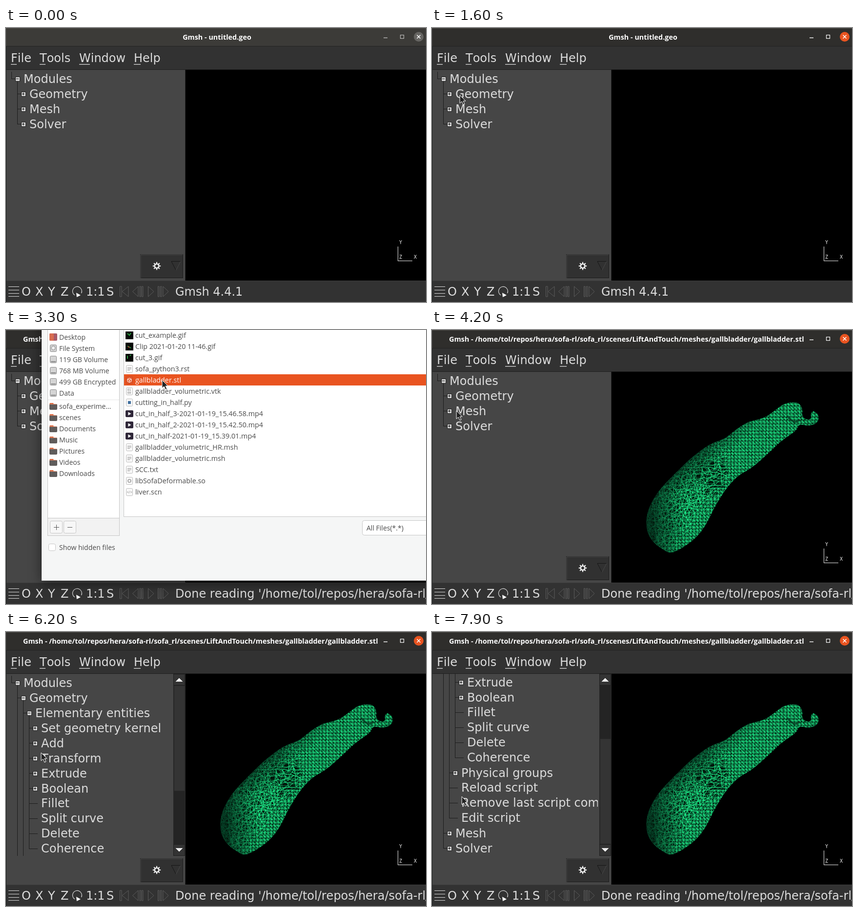
Animation, 861 px wide and 563 px high, one loop 8 s. Source, as an HTML page:

```html
<!DOCTYPE html>
<html lang="en">
<head>
<meta charset="utf-8">
<title>Opening a mesh</title>
<style>
  html, body { margin: 0; width: 100%; height: 100%; overflow: hidden; background: #000; }
  svg { display: block; width: 100vw; height: 100vh; }
  text { white-space: pre; }
  .ui { font: 24px "DejaVu Sans", sans-serif; font-kerning: none; font-variant-ligatures: none; fill: #dcdcdc; }
  .title { font: bold 14.4px "Open Sans", sans-serif; fill: #fff; }
  .list { font: 14.3px "Open Sans", sans-serif; fill: #4a4a4a; }
  .side { font: 14px "Open Sans", sans-serif; fill: #4a4a4a; }
  .axis { font: 10px "DejaVu Sans Mono", monospace; fill: #eee; }
  .tiny { font: 6px "DejaVu Sans Mono", monospace; fill: #777; }
  .crisp { shape-rendering: crispEdges; }
</style>
</head>
<body>
<svg id="stage" viewBox="0 0 861 563"></svg>
<script>
const stage = document.getElementById('stage');

function add(parent, tag, attrs = {}, text) {
  const el = document.createElementNS('http://www.w3.org/2000/svg', tag);
  for (const key in attrs) el.setAttribute(key, attrs[key]);
  if (text !== undefined) el.textContent = text;
  parent.appendChild(el);
  return el;
}
const group = (p, attrs) => add(p, 'g', attrs);
const rect = (p, x, y, width, height, fill, more) => add(p, 'rect', { x, y, width, height, fill, ...more });
const label = (p, x, y, text, cls = 'ui', more) => add(p, 'text', { x, y, class: cls, ...more }, text);
const path = (p, d, stroke, fill = 'none', more) => add(p, 'path', { d, stroke, fill, ...more });
const clip = id => add(stage, 'clipPath', { id });
const clamp = (v, max = 1) => Math.max(0, Math.min(max, v));
const show = (el, on) => el.setAttribute('display', on ? 'inline' : 'none');

// ---- window frame ----
rect(stage, 0, 0, 861, 563, '#323232');
const bar = rect(stage, 0, 0, 861, 38, '#3c3b38');
rect(stage, 0, 0, 861, 1, '#4b4a47');
rect(stage, 0, 37, 861, 1, '#222');
const shortTitle = label(stage, 432.5, 24, 'Gmsh - untitled.geo', 'title', { 'text-anchor': 'middle' });
const longTitle = label(stage, 35, 24,
  'Gmsh - /home/tol/repos/hera/sofa-rl/sofa_rl/scenes/LiftAndTouch/meshes/gallbladder/gallbladder.stl', 'title');
const controls = group(stage);
rect(controls, 774, 19.5, 8, 1.4, '#fff');
rect(controls, 808.5, 14.5, 7, 7, 'none', { stroke: '#fff', 'stroke-width': 1.2 });
const closeDisc = add(stage, 'circle', { cx: 846, cy: 18, r: 10 });
path(stage, 'M842.5 14.5l7 7m0-7l-7 7', '#fff', 'none', { 'stroke-width': 1.5 });

const fileTab = rect(stage, 1, 39, 60, 46, '#000080');
[['File', 10, 12], ['Tools', 69, 12], ['Window', 150, 22], ['Help', 262, 14]].forEach(([s, x, w]) => {
  label(stage, x, 70, s);
  rect(stage, x, 74, w, 1.3, '#dcdcdc');
});

// ---- side panel and viewport ----
rect(stage, 0, 85, 861, 1, '#1e1e1e');
rect(stage, 0, 86, 367, 433, '#464646');
rect(stage, 367, 86, 1, 433, '#2a2a2a');
rect(stage, 368, 86, 493, 433, '#000');
rect(stage, 0, 519, 861, 1, '#3c3c3c');
rect(stage, 0, 38, 1, 525, '#161a19');

const treeClip = rect(clip('treeClip'), 1, 86, 339, 433, '#fff');
const treeBox = group(stage, { 'clip-path': 'url(#treeClip)' });

// depth, label; a leading dash marks an entry without a box
const entries = [
  [0, 'Modules'], [1, 'Geometry'], [2, 'Elementary entities'],
  [3, 'Set geometry kernel'], [3, 'Add'], [3, 'Transform'], [3, 'Extrude'], [3, 'Boolean'],
  [3, '-Fillet'], [3, '-Split curve'], [3, '-Delete'], [3, '-Coherence'],
  [2, 'Physical groups'], [2, '-Reload script'], [2, '-Remove last script command'], [2, '-Edit script'],
  [1, 'Mesh'], [1, 'Solver']
];

function buildTree(maxDepth) {
  const g = group(treeBox);
  const lines = group(g, { class: 'crisp' });
  const rows = entries.filter(e => e[0] <= maxDepth);
  const lastY = [];
  rows.forEach(([depth, name], i) => {
    const y = 104 + 31 * i, x = 23 + 12 * depth;
    const leaf = name[0] === '-';
    const top = depth ? lastY[depth - 1] : 90;
    lastY[depth] = y;
    path(lines, `M${x - 11.5} ${top}V${y + .5}H${leaf ? x + 6 : x}`, '#1c1c1c');
    label(g, x + 13, y + (leaf ? 8 : 9), leaf ? name.slice(1) : name);
    if (leaf) return;
    const open = rows[i + 1] && rows[i + 1][0] > depth;
    const box = group(g, { class: 'crisp' });
    rect(box, x - 4, y - 4, 9, 9, '#d0d0d0', { stroke: '#222', 'stroke-width': 1 });
    rect(box, x - 2, y, 5, 1, '#000');
    if (!open) rect(box, x, y - 2, 1, 5, '#000');
  });
  return g;
}
const trees = [1, 2, 3].map(buildTree);

const scroller = group(stage, { class: 'crisp' });
rect(scroller, 343, 86, 24, 374, '#242424');
const thumb = rect(scroller, 344, 110, 22, 216, '#343434', { stroke: '#282828' });
[[86, 'M348 102l7-8 7 8z'], [436, 'M348 444l7 8 7-8z']].forEach(([y, d]) => {
  rect(scroller, 343.5, y + .5, 23, 23, '#343434', { stroke: '#1e1e1e' });
  path(scroller, d, 'none', '#eee');
});

rect(stage, 275.5, 465.5, 87, 48, '#313131', { stroke: '#1c1c1c' });
path(stage, 'M276 514V466H362', '#4c4c4c');
add(stage, 'circle', { cx: 309, cy: 489, r: 4.2, fill: 'none', stroke: '#eee', 'stroke-width': 2.6 });
for (let i = 0; i < 8; i++)
  rect(stage, 307.9, 480.8, 2.2, 4, '#eee', { transform: `rotate(${45 * i} 309 489)` });
path(stage, 'M348.5 498L339 479.5H358', '#161616');
path(stage, 'M358 479.5L348.5 498', '#484848');

// ---- wireframe ----
const outline = [
  739,148, 752,150, 760,162, 758,177, 766,184, 778,184, 776,171, 783,166, 792,174, 793,185,
  785,194, 770,197, 752,193, 747,207, 715,228, 690,253, 655,284, 630,297, 608,319, 590,345,
  575,372, 562,400, 545,423, 525,440, 505,452, 488,459, 472,450, 455,438, 443,420, 439,400,
  441,376, 452,350, 470,324, 497,296, 530,264, 560,241, 578,231, 600,224, 620,207, 648,188,
  680,182, 700,168, 720,152
];

function smoothShape(p) {
  const n = p.length / 2, at = i => [p[2 * (i % n)], p[2 * (i % n) + 1]];
  const mid = i => at(i).map((v, k) => (v + at(i + 1)[k]) / 2);
  let d = 'M' + mid(0);
  for (let i = 1; i <= n; i++) d += `Q${at(i)} ${mid(i)}`;
  return d + 'Z';
}

function noise(i, j) {
  const v = Math.sin(i * 127.1 + j * 311.7) * 43758.5453;
  return v - Math.floor(v);
}

const shape = smoothShape(outline);
path(clip('body'), shape);
const mesh = group(stage, { 'clip-path': 'url(#body)' });
path(mesh, shape, '#0a5632', '#02180c');

// regular on the lit flank, loose towards the dark side and around the waist
function wire(step, wobble, gain, seed) {
  const levels = Array(8).fill('');
  const waist = (x, y) => clamp(1.5 - Math.hypot(x - 565, y - 295) / 34);
  const dark = (x, y) => clamp((620 - x) / 90) * clamp((945 - x - y) / 50);
  const point = (i, j) => {
    const x = 436 + i * step, y = 146 + j * step;
    const k = 2 * wobble * Math.max(waist(x, y), dark(x, y)) + .3;
    return [x + (noise(i + seed, j) - .5) * k, y + (noise(j, i + seed + 40) - .5) * k];
  };
  const f = v => v.map(c => c.toFixed(1));
  for (let i = 0; i * step < 360; i++) for (let j = 0; j * step < 315; j++) {
    const a = point(i, j), sum = a[0] + a[1];
    if (sum < 780 || sum > 995) continue;
    const light = Math.min(clamp(.4 + (sum - 810) / 80), clamp(.12 + (a[0] - 455) / 75), clamp(.5 + (980 - sum) / 50));
    const shade = clamp(light * gain * (.85 + .3 * noise(j + seed, i)));
    const b = point(i + 1, j), c = point(i, j + 1), e = point(i + 1, j + 1);
    const gap = noise(i + 7, j + seed) < .5 * waist(...a);
    const flip = dark(...a) > .2 && noise(i, j + seed) < .5;
    const diagonal = gap ? '' : flip ? `M${f(b)}L${f(c)}` : `M${f(a)}L${f(e)}`;
    levels[Math.round(shade * 7)] += `M${f(b)}L${f(a)}` + (gap ? '' : `L${f(c)}`) + diagonal;
  }
  levels.forEach((d, k) => {
    const s = k / 7;
    path(mesh, d || 'M0 0', `rgb(${6 + 26 * s | 0},${66 + 184 * s | 0},${40 + 106 * s | 0})`);
  });
}
wire(6, 3, .36, 9);
wire(7.2, 3.4, 1, 0);
path(mesh, 'M728 176Q742 196 754 184', '#06331d', 'none', { 'stroke-width': 4, 'stroke-opacity': .7 });

path(stage, 'M803.5 449V478.5H833', '#eee', 'none', { class: 'crisp' });
[['Y', 806, 444], ['X', 836, 474], ['Z', 806, 474]].forEach(([s, x, y]) => label(stage, x, y, s, 'axis'));

// ---- status bar ----
path(stage, 'M5 531.5H27M5 538.5H27M5 545.5H27M5 551.5H27', '#dcdcdc', 'none', { class: 'crisp' });
[['O', 32], ['X', 60], ['Y', 86], ['Z', 112], ['1:1', 164], ['S', 206]].forEach(([s, x]) => label(stage, x, 550, s));
path(stage, 'M141 549A9.5 9.5 0 1 1 154.5 545', '#dcdcdc', 'none', { 'stroke-width': 1.2 });
path(stage, 'M144 544l9 5-8 4z', 'none', '#fff');
path(stage, 'M233.5 531H237V552H233.5ZM251 531V552L238 541.5ZM271 531V552L259.5 541.5Z' +
  'M274 531h2.5v21H274ZM278.5 531h2.5v21h-2.5ZM291.5 531V552L303 541.5Z' +
  'M311.5 531h2.5v21h-2.5ZM316.5 531h2.5v21h-2.5ZM322 531V552L333 541.5Z', '#5c5c5c');
const status = label(stage, 347, 550, '');

// ---- File menu ----
const menu = group(stage);
rect(menu, 3, 86, 462, 454, '#323232', { stroke: '#1a1a1a', style: 'filter:drop-shadow(0 3px 6px rgba(0,0,0,.5))' });
const hover = rect(menu, 6, 89, 456, 32, '#000080');
[['New...', 'Ctrl+N'], ['Open...', 'Ctrl+O'], ['Merge...', 'Shift+Ctrl+O'], ['Watch Pattern...'],
 ['Open Recent', '▶'], ['Clear'], ['Remote', '▶'], ['Rename...', 'Ctrl+R'], ['Delete'],
 ['Save Mesh', 'Shift+Ctrl+S'], ['Save Model Options', 'Ctrl+J'],
 ['Save Options As Default', 'Shift+Ctrl+J'], ['Export...', 'Ctrl+E'], ['Quit', 'Ctrl+Q']
].forEach(([name, keys], i) => {
  const y = 113 + 32 * i;
  label(menu, 12, y, name);
  if (keys) label(menu, 458, y, keys, 'ui', { 'text-anchor': 'end' });
  if ([4, 6, 8, 11].includes(i)) rect(menu, 4, y + 8, 460, 1, '#555');
});

// ---- file dialog ----
const dialog = group(stage);
rect(dialog, 73, -250, 850, 765, '#f5f6f6', { style: 'filter:drop-shadow(0 4px 12px rgba(0,0,0,.55))' });
const edge = { stroke: '#c6c6c6' };
rect(dialog, 85.5, -100, 147, 522.5, '#f2f2f2', edge);
rect(dialog, 85.5, -100, 147, 486.5, '#fff', edge);
rect(dialog, 241.5, -100, 700, 483.5, '#fff', edge);
rect(dialog, 86, 143, 146, 1, '#e6e6e6');

['Desktop', 'File System', '119 GB Volume', '768 MB Volume', '499 GB Encrypted', 'Data', 'sofa_experime…',
 'scenes', 'Documents', 'Music', 'Pictures', 'Videos', 'Downloads'].forEach((name, i) => {
  const y = 15 + 23 * i + (i > 5 ? 4 : 0);
  label(dialog, 109, y + 5, name, 'side');
  if (i > 5) {
    rect(dialog, 89.5, y - 7, 8, 5, '#d9643a', { rx: 1 });
    rect(dialog, 89, y - 5, 16, 12, '#5f5c5b', { rx: 2 });
    rect(dialog, 90, y - 5, 14, 1, '#e08a6c');
  } else if (i === 0) {
    rect(dialog, 89, y - 8, 16, 15, '#a85a68', { rx: 2 });
    rect(dialog, 89, y - 8, 9, 15, '#d86c50', { rx: 2 });
  } else {
    rect(dialog, 90.5, y - 7.5, 13, 14, '#d4d4d4', { rx: 2, stroke: '#888' });
    if (i === 1) add(dialog, 'circle', { cx: 97, cy: y - 1, r: 4, fill: '#eee', stroke: '#888' });
    else rect(dialog, 92, y + 3, 10, 2, '#8a8a8a');
  }
});

const picked = rect(dialog, 242, 91, 640, 23, '#e95420');
const files = [
  ['cut_example.gif', 'gif'], ['Clip 2021-01-20 11-46.gif', 'gif'], ['cut_3.gif', 'gif'], ['sofa_python3.rst', 'doc'],
  ['gallbladder.stl', 'stl'], ['gallbladder_volumetric.vtk', 'bin'], ['cutting_in_half.py', 'py'],
  ['cut_in_half_3-2021-01-19_15.46.58.mp4', 'mp4'], ['cut_in_half_2-2021-01-19_15.42.50.mp4', 'mp4'],
  ['cut_in_half-2021-01-19_15.39.01.mp4', 'mp4'], ['gallbladder_volumetric_HR.msh', 'doc'],
  ['gallbladder_volumetric.msh', 'doc'], ['SCC.txt', 'doc'], ['libSofaDeformable.so', 'so'], ['liver.scn', 'xml']
];
function fileIcon(kind, y, i) {
  const g = group(dialog, { transform: `translate(245 ${y - 8})` });
  if (kind === 'gif') {
    rect(g, 0, 0, 16, 16, '#050805');
    path(g, ['M4 4l4 4 3-5', 'M4 7l7 4', 'M4 4v6M9 4l2-2'][i], '#2aa040', 'none', { 'stroke-width': 2 });
    if (i === 1) rect(g, 5, 8, 3, 2, '#b33');
  } else if (kind === 'mp4') {
    rect(g, 0, 1, 16, 14, '#2e2638', { rx: 2 });
    path(g, 'M5.5 4.5v7l6-3.5z', 'none', '#fff');
  } else if (kind === 'stl') {
    rect(g, 1.5, .5, 13, 15, '#e2572b', { rx: 2, stroke: '#c9481f' });
    path(g, 'M8 4l4 2v4.5l-4 2-4-2V6zM4 6l4 2 4-2M8 8v4.5', '#fff');
  } else {
    rect(g, 1.5, .5, 13, 15, '#f8f8f8', { rx: 2, stroke: '#bbb' });
    if (kind === 'doc') path(g, 'M4 5.5h8M4 8h8M4 10.5h5', '#999');
    if (kind === 'bin') { label(g, 4, 7, '01', 'tiny'); label(g, 4, 13, '00', 'tiny'); }
    if (kind === 'py') rect(g, 5, 5, 6, 6, '#3f6f9f');
    if (kind === 'so') add(g, 'circle', { cx: 8, cy: 8, r: 3, fill: 'none', stroke: '#999', 'stroke-width': 1.5 });
    if (kind === 'xml') label(g, 2.7, 10, '</>', 'tiny');
  }
}
const names = files.map(([name, kind], i) => {
  const y = 11 + 23 * i;
  fileIcon(kind, y, i);
  return label(dialog, 265, y + 5, name, 'list');
});

[90.5, 118.5].forEach(x => rect(dialog, x, 392.5, 25, 25, '#f7f7f7', { rx: 3, ...edge }));
path(dialog, 'M98 405.5h11M103.5 400v11M126 405.5h10', '#555');
rect(dialog, 87.5, 439.5, 14, 14, '#fff', { rx: 3, ...edge });
label(dialog, 109, 452, 'Show hidden files', 'side');
rect(dialog, 730.5, 391.5, 190, 30, '#fff', { rx: 4, ...edge });
label(dialog, 739, 412, 'All Files(*.*)', 'side');

// ---- pointer ----
const pointer = group(stage);
path(pointer, 'M0 0V16.5L4 13L7 19.5L10 18.2L7 12H12Z', '#fff', '#222', { 'stroke-width': 1 });

// time, x, y
const track = [
  [300, 119, 8], [400, 67, 69], [500, 67, 69], [600, 28, 70], [700, 24, 72], [800, 24, 72],
  [1100, 57, 138], [1800, 57, 138], [2000, 165, 104], [2100, 217, 94], [2200, 217, 94], [2300, 272, 97],
  [2500, 320, 111], [2700, 327, 112], [2800, 327, 112], [2900, 320, 103], [3600, 320, 103],
  [3800, 220, 140], [4000, 95, 176], [4100, 66, 178], [4200, 50, 166], [4500, 39, 142],
  [4600, 35, 138], [4900, 35, 138], [5200, 76, 219], [5300, 80, 225], [5600, 47, 167],
  [5900, 47, 167], [6200, 72, 248], [6300, 78, 285], [6600, 61, 338], [8000, 61, 338]
];
function along(t) {
  const i = track.findIndex(k => k[0] > t);
  const a = track[i - 1], b = track[i], p = (t - a[0]) / (b[0] - a[0]);
  return [a[1] + (b[1] - a[1]) * p, a[2] + (b[2] - a[2]) * p].map(Math.round);
}

// time, opacity, scale
const fades = [[0, 0, 1], [1800, .3, .92], [1900, .75, .97], [2000, 1, 1], [3400, .4, .96], [3500, 0, 1]];

function draw(t) {
  const active = t >= 600 && t < 1700 || t >= 3300;
  const loaded = t >= 3300;
  bar.setAttribute('fill', active ? '#2f2e2c' : '#3c3b38');
  closeDisc.setAttribute('fill', active ? '#e95420' : '#666562');
  controls.setAttribute('opacity', active ? 1 : .65);
  show(shortTitle, !loaded);
  show(longTitle, loaded);
  status.textContent = loaded ? "Done reading '/home/tol/repos/hera/sofa-rl/sofa_rl" : 'Gmsh 4.4.1';
  show(mesh, t >= 3400);

  const menuOpen = t >= 600 && t < 1400;
  show(menu, menuOpen);
  show(fileTab, menuOpen);
  show(hover, t >= 900);
  hover.setAttribute('y', t < 1100 ? 89 : 121);

  const [, opacity, scale] = fades.filter(k => k[0] <= t).pop();
  show(dialog, opacity > 0);
  dialog.setAttribute('opacity', opacity);
  dialog.setAttribute('transform', `translate(490 130) scale(${scale}) translate(-490 -130)`);
  show(picked, t >= 2900);
  names[4].style.fill = t >= 2900 ? '#fff' : '';

  const level = t >= 5800 ? 2 : t >= 4800 ? 1 : 0;
  trees.forEach((g, i) => show(g, i === level));
  const ticks = clamp((t - 6700) / 100, 8) + clamp((t - 7700) / 100, 2);
  trees[2].setAttribute('transform', `translate(0 ${-Math.round(18.7 * ticks)})`);
  thumb.setAttribute('y', Math.round(110 + 10.9 * ticks));
  show(scroller, level === 2);
  treeClip.setAttribute('height', level === 2 ? 374 : 433);

  show(pointer, t >= 300);
  if (t >= 300) pointer.setAttribute('transform', `translate(${along(t)})`);
}

const start = performance.now();
let shown = -1;
function tick() {
  const t = Math.floor((performance.now() - start) % 8000 / 100) * 100;
  if (t !== shown) draw(shown = t);
  requestAnimationFrame(tick);
}
tick();
</script>
</body>
</html>
```
